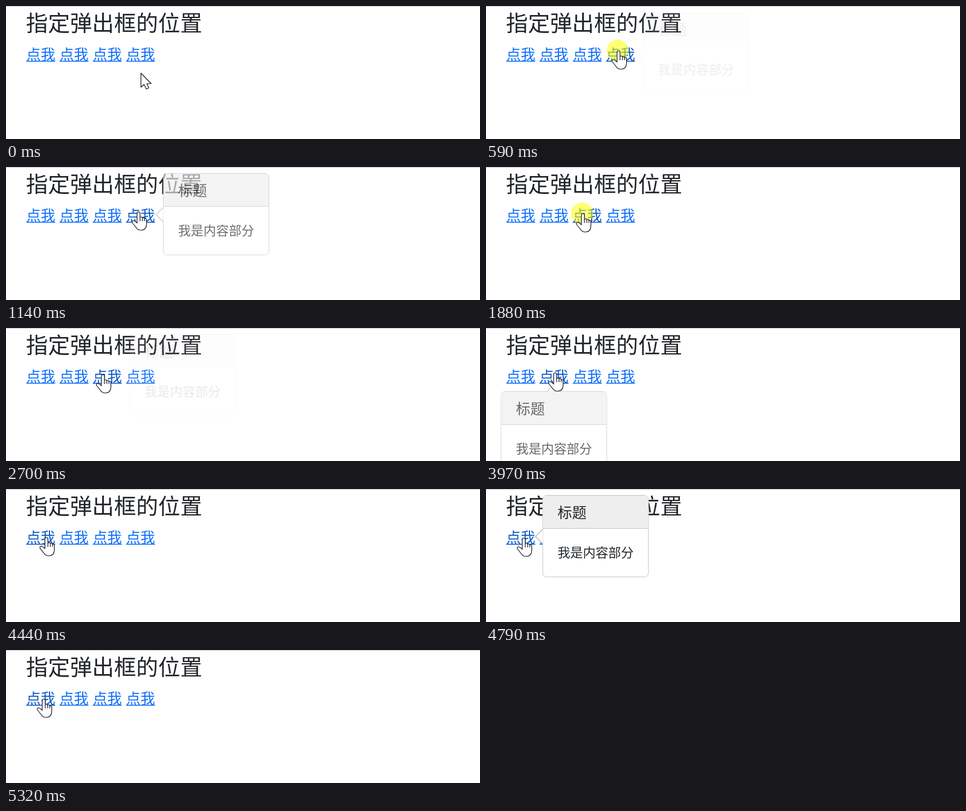
Write an HTML page that moves like this. It is 785 px wide and 221 px high and loops after 5.67 s.

```html
<!DOCTYPE html>
<html lang="zh-CN">
<head>
<meta charset="utf-8">
<title>弹出框</title>
<style>
  html, body { margin: 0; width: 100%; height: 100%; overflow: hidden; background: #fff; }
  svg { display: block; font-family: "Noto Sans CJK SC", "Noto Sans CJK", sans-serif; fill: #212529; }
  .link { fill: #0d6efd; stroke: none; }
  .link.hover { fill: #0a58ca; }
  .box { fill: #fff; stroke: #c6c6c6; }
  .tip { fill: #fff; stroke: #b8b8b8; stroke-width: 1.4; }
  .cursor { fill: #fff; stroke: #1b1b2b; stroke-width: 1.2; stroke-linejoin: round; }
</style>
</head>
<body>
<svg id="stage" width="785" height="221" viewBox="0 0 785 221"></svg>
<script>
const LOOP = 5670, FADE = 150, PRESS = 125;
const LINK_X = 33.5, LINK_STEP = 55.1, LINK_W = 48;

// Popover position, arrow side, and the times it starts to show and to hide
const popovers = [
  { x: 260, y: 10, side: 'left', show: 580, hide: 1090 },
  { x: 204.5, y: 10, side: 'left', show: 1930, hide: 2565 },
  { x: 24.5, y: 105, side: 'top', show: 3410, hide: 3925 },
  { x: 93.5, y: 10, side: 'left', show: 4640, hide: 5140 }
];
const presses = [520, 1010, 1880, 2500, 3360, 3840, 4570, 5060];

// Pointer path: time, x, y
const path = [
  [0, 223, 111], [70, 223, 111], [400, 218, 74],
  [1280, 218, 74], [1680, 159, 77],
  [2750, 159, 77], [3030, 145, 77], [3240, 113, 74],
  [4100, 113, 74], [4370, 70, 79], [4510, 61, 81], [LOOP, 61, 81]
];

const tips = { left: 'M.5 57 L-11.5 69 L.5 81', top: 'M76 .5 L88 -11.5 L100 .5' };

const linkMarkup = i => {
  const x = LINK_X + i * LINK_STEP;
  return `<g class="link"><text x="${x}" y="88.7" font-size="24">点我</text>
    <rect x="${x}" y="91" width="${LINK_W}" height="1.5"/></g>`;
};

const popoverMarkup = p => `<g class="popover" transform="translate(${p.x} ${p.y})">
  <rect class="box" x=".5" y=".5" width="175" height="135.5" rx="6.5"/>
  <path fill="#eee" d="M1 55 V7 Q1 1 7 1 H169 Q175 1 175 7 V55 Z"/>
  <path stroke="#c8c8c8" d="M1 55.5 H175"/>
  <path class="tip" d="${tips[p.side]}"/>
  <text x="25" y="38" font-size="24">标题</text>
  <text x="25" y="103" font-size="21">我是内容部分</text></g>`;

const stage = document.getElementById('stage');
stage.innerHTML = `
  <rect width="785" height="1" fill="#c8c8c8"/>
  <text x="33" y="41.5" font-size="36.5">指定弹出框的位置</text>
  ${[0, 1, 2, 3].map(linkMarkup).join('')}
  ${popovers.map(popoverMarkup).join('')}
  <g id="pointer">
    <circle id="press" r="18" fill="#ff0" fill-opacity=".55"/>
    <path id="arrow" class="cursor" d="M.5 .5 V24 L5.5 19.3 L9.5 27 L13.5 25 L10.3 18 H17.5 Z"/>
    <path id="hand" class="cursor" d="M-1 19 V3 Q-1 .5 1.5 .5 Q4 .5 4 3 V11 Q4 9 6 9 Q8 9 8 11.5
      Q8 10 9.8 10 Q11.5 10 11.5 12.5 Q11.5 11.5 13 11.5 Q14.7 11.5 14.7 14 V21 Q14.5 31 5.5 31
      Q0 31 -3 26 L-9 18.5 Q-10 15.5 -7.5 15 Q-5 15 -1 19 Z M4 10 V16 M8 11 V16 M11.5 12 V16"/>
  </g>`;

const byId = id => document.getElementById(id);
const links = [...stage.querySelectorAll('.link')];
const boxes = [...stage.querySelectorAll('.popover')];
const clamp = v => Math.min(1, Math.max(0, v));
const show = (el, on) => el.setAttribute('visibility', on ? 'visible' : 'hidden');

function pointerAt(t) {
  const i = path.findIndex(key => key[0] > t);
  const [t0, x0, y0] = path[i - 1], [t1, x1, y1] = path[i];
  const k = (t - t0) / (t1 - t0);
  return [x0 + (x1 - x0) * k, y0 + (y1 - y0) * k];
}

function draw(now) {
  const t = now % LOOP;
  const [x, y] = pointerAt(t);
  let hovering = false;
  links.forEach((link, i) => {
    const left = LINK_X + i * LINK_STEP;
    const over = x >= left && x <= left + LINK_W && y < 96;
    link.classList.toggle('hover', over);
    hovering ||= over;
  });
  popovers.forEach((p, i) => {
    const alpha = clamp((t - p.show) / FADE) - clamp((t - p.hide) / FADE);
    boxes[i].setAttribute('opacity', alpha);
  });
  byId('pointer').setAttribute('transform', `translate(${x} ${y})`);
  show(byId('press'), presses.some(p => t >= p && t < p + PRESS));
  show(byId('hand'), hovering);
  show(byId('arrow'), !hovering);
  requestAnimationFrame(draw);
}
draw(performance.now());
</script>
</body>
</html>
```
